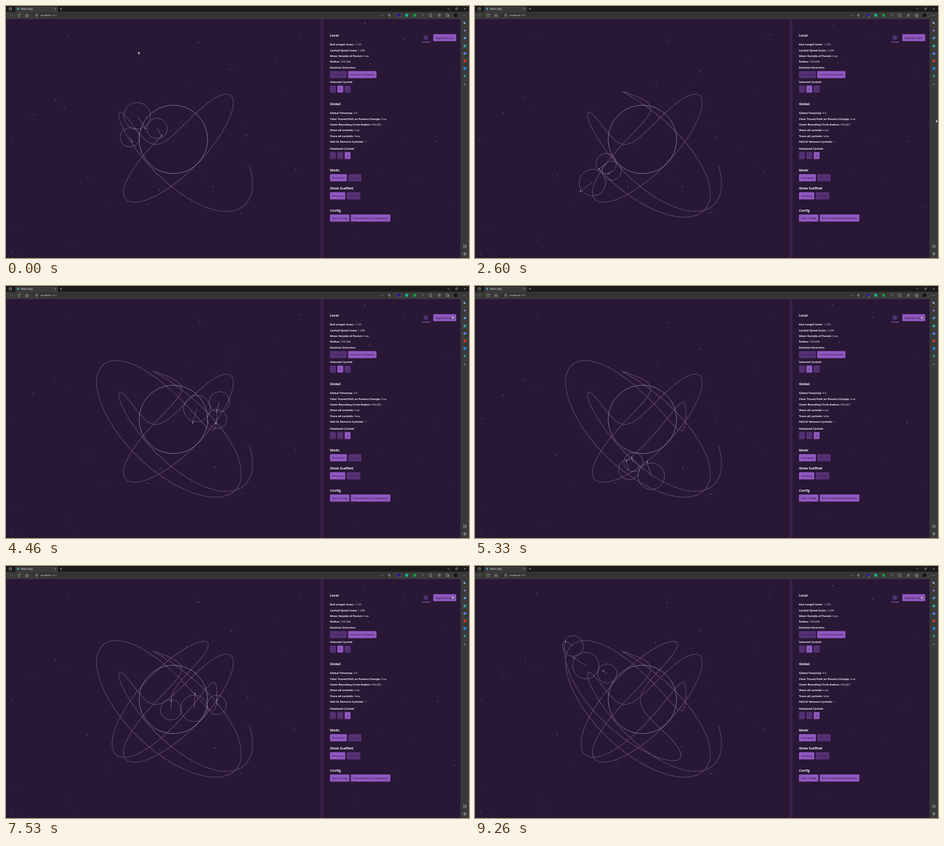
An HTML page for the animation above (9.32 s loop, 1000 by 544 pixels).

```html
<!DOCTYPE html>
<html lang="en">
<head>
<meta charset="utf-8">
<title>Cycloids</title>
<style>
  html, body { margin: 0; width: 100%; height: 100%; overflow: hidden; background: #291736; }
  svg { display: block; width: 100vw; height: 100vh; }
  text { font-family: "Open Sans", "Noto Sans", sans-serif; font-size: 5.9px; fill: #f7f4f9; }
  .head { font-size: 7.3px; font-weight: 700; }
  .label { font-weight: 700; }
  .value { font-weight: 400; }
  .button { font-size: 6px; fill: #2a1738; }
  .icons { fill: none; stroke: #c8c8c8; stroke-width: .7; }
  .off { filter: blur(.6px); }
  .off text { fill: #3c2251; }
</style>
</head>
<body>
<svg viewBox="0 0 1000 544">
  <rect width="1000" height="544" fill="#291736"/>
  <rect x="679.5" y="28" width="6.5" height="516" fill="#382148"/>
  <g id="panel"></g>
  <g id="stars" fill="#a596b3"></g>
  <path id="trace" fill="none" stroke="#614975" stroke-width="1.3" stroke-linejoin="round"/>
  <g id="wheels" fill="none"></g>
  <g id="chrome">
    <rect width="1000" height="13" fill="#1b1b1b"/>
    <path d="M0 12.5H18Q20 12.5 20 10V3Q20 1 22 1H110Q112 1 112 3V10Q112 12.5 114 12.5H1000V544H981.5V27.5H0Z" fill="#3a3a3a"/>
    <rect x="57" y="14.5" width="779" height="11" rx="2" fill="#323232"/>
    <path d="M0 27.4H981.5" stroke="#555" stroke-width=".6"/>
    <circle cx="26" cy="6.2" r="2.3" fill="#4f9db0"/>
    <text x="32.5" y="8.2" style="font-size:5.4px">React App</text>
    <text x="75" y="21.9" style="font-size:5.3px">localhost<tspan fill="#a5a5a5">:3001</tspan></text>
    <text x="811" y="22" style="font-size:5px;fill:#999">A”</text>
    <g class="icons">
      <path d="M7 4H12V9H7ZM7 5H12"/>
      <path d="M104.7 4.8l2.6 2.6m0-2.6l-2.6 2.6M116.2 6h5m-2.5-2.5v5"/>
      <path d="M953.5 6h4m14-1.8h3.5v3.5h-3.5zM989.4 4.3l3.4 3.4m0-3.4l-3.4 3.4"/>
      <path d="M14 20H8.5M11 17.5L8.5 20L11 22.5" stroke="#686868"/>
      <path d="M30.4 18.5A2.8 2.8 0 1 0 30.8 20.6M30.7 16.8V18.8H28.7"/>
      <path d="M42.5 19.4L45.2 17L48 19.4V22.7H46.3V20.6H44.2V22.7H42.5Z"/>
      <circle cx="66.5" cy="19.8" r="2.7"/>
      <path d="M66.5 19.4v2m0-3.3v.6"/>
      <path d="M914.5 18h1.7a1.2 1.2 0 0 1 2.3 0h1v4.6h-5z"/>
      <path d="M950.5 17.2h4.5v4.3h-4.5zM952 22.8h4.5v-4.3"/>
      <path d="M986.3 20h6" stroke-dasharray=".9 1.4" stroke-width="1"/>
      <circle cx="900" cy="20" r="2" stroke="#929292"/>
      <path d="M982.5 160.7h17" stroke="#505050"/>
      <path d="M988.5 169h5m-2.5-2.5v5" stroke="#a8a8a8"/>
      <path d="M988.3 516.5h5.4v4.8h-5.4zm2.2 2.5h3.2"/>
      <circle cx="991" cy="535" r="2.7"/><circle cx="991" cy="535" r="1"/>
    </g>
    <circle cx="848.6" cy="19.8" r="3.4" fill="#35129b"/>
    <text x="849.8" y="23.8" style="font-size:4px">4</text>
    <circle cx="865.5" cy="20" r="3.4" fill="#16b58a"/>
    <rect x="879.5" y="17" width="6" height="6" rx="1" fill="#1a9a45"/>
    <circle cx="971" cy="20" r="4.4" fill="#17171a"/>
  </g>
  <path id="cursor" d="M0 0V6.3L1.5 5L2.4 7.1L3.4 6.7L2.5 4.6H4.4Z" fill="#fff" stroke="#111" stroke-width=".4"/>
</svg>
<script>
const LOOP = 9320, FPS = 15, RAD = Math.PI / 180;
const $ = id => document.getElementById(id);

function set(node, attrs) {
  for (const key in attrs) node.setAttribute(key, attrs[key]);
  return node;
}
function add(parent, tag, attrs, content) {
  const node = set(document.createElementNS("http://www.w3.org/2000/svg", tag), attrs);
  if (content) node.textContent = content;
  return parent.appendChild(node);
}

// Control panel: text and buttons flow from a left edge
const panel = $("panel"), LEFT = 699.7, PITCH = 12.45, PAD = 4.7, GAP = 3.1;

function write(y, content, cls, value) {
  const node = add(panel, "text", { x: LEFT, y: y + 2.1, class: cls }, content);
  if (value) add(node, "tspan", { class: "value" }, "\u00a0" + value);
}

function button(x, y, content, on) {
  const group = add(panel, "g", { class: on ? "" : "off" });
  const box = add(group, "rect", { x, y, height: 15.3, rx: 1.5, fill: on ? "#9058c1" : "#553174" });
  const label = add(group, "text", { x: x + PAD, y: y + 9.8, class: on ? "button" : "" }, content);
  const width = label.getComputedTextLength() + 2 * PAD;
  set(box, { width });
  return x + width + GAP;
}

// A leading "~" marks a dimmed button
function block(y, head, lines, buttons = []) {
  if (head) {
    write(y + .5, head, "head");
    y += lines.length ? 20 : .9;
  }
  lines.forEach((line, i) => {
    const [label, value] = line.split(": ");
    write(y + i * PITCH, label.replace(/:?$/, ":"), "label", value);
  });
  y += Math.max(0, lines.length - 1) * PITCH + 7.7;
  buttons.reduce((x, name) => button(x, y, name.replace("~", ""), name[0] !== "~"), LEFT);
}

block(63, "Local", [
  "Rod Length Scale: 1.133", "Cycloid Speed Scale: 1.298", "Move Outside of Parent: true",
  "Radius: 166.668", "Rotation Direction"
], ["~Clockwise", "Counter Clockwise"]);
block(164, "", ["Selected Cycloid"], ["~0", "1", "~2"]);
block(211, "Global", [
  "Global Timestep: 4.4", "Clear Traced Path on Params Change: true",
  "Outer Bounding Circle Radius: 430.667", "Show all cycloids: true",
  "Trace all cycloids: false", "Add Or Remove Cycloids: \u00a0+\u00a0\u00a0\u00a0-"
]);
block(307.5, "", ["Displayed Cycloid"], ["~0", "~1", "2"]);
block(354.5, "Mode", [], ["Animated", "~Instant"]);
block(393.5, "Show Scaffold", [], ["Showing", "~Hidden"]);
block(441.5, "Config", [], ["Save Config", "Show Saved Configurations"]);
button(922.8, 60.7, "Register/Login", true);
add(panel, "circle", { cx: 907, cy: 68, r: 5.5, fill: "#49316a" });
add(panel, "rect", { x: 897.5, y: 77, width: 18.5, height: 1.5, rx: .7, fill: "#9058c1" });

// Browser icons
const polar = ([x, y], r, deg) => [x + r * Math.cos(deg * RAD), y + r * Math.sin(deg * RAD)];
const format = p => p[0].toFixed(2) + " " + p[1].toFixed(2);

function starPath(center, r) {
  const corners = Array.from({ length: 10 }, (_, i) => format(polar(center, i % 2 ? r * .45 : r, i * 36 - 90)));
  return `M${corners.join("L")}Z`;
}
for (const x of [828, 936]) add($("chrome"), "path", { d: starPath([x, 20], 3), class: "icons" });

const disc = "M-3 0a3 3 0 1 1 6 0a3 3 0 1 1-6 0", square = "M-3-3H3V3H-3Z";
[
  ["#8cbde8", "M.8.8a2 2 0 1 0-.6.6L2.4 3.6 3 3Z"],
  ["#a878dc", "M0-3L1-1 3 0 1 1 0 3-1 1-3 0-1-1Z"],
  ["#5ea4ea", "M-3 .6L.5-2.7H3V-.1L-.5 3.3Z"],
  ["#31a29c", "M-3-1.5H-1V-3H1V-1.5H3V3H-3Z"],
  ["#5a82ea", "M-3 3V0L-1-3 1-1 2-2 3 0V3Z"],
  ["#d13a28", disc],
  ["#2485d2", square],
  ["#2fae8d", "M0-3.5L3.2 1.5H.5V3.5H-.5V1.5H-3.2Z"]
].forEach(([fill, d], i) => add($("chrome"), "path", { d, fill, transform: `translate(991 ${36.5 + i * 16.4})` }));

// Background stars, each wobbling around its home
const hash = n => { const v = Math.sin(n * 127.1 + 3.7) * 43758.5453; return v - Math.floor(v); };
const stars = Array.from({ length: 46 }, (_, i) => ({
  x: 975 * hash(i), y: 32 + 508 * hash(i + 100),
  speed: 2 + 3 * hash(i + 200), phase: 6.3 * hash(i + 300),
  node: add($("stars"), "circle", { r: .5 + .5 * hash(i + 400), opacity: .4 + .4 * hash(i + 400) })
}));

// Chain of wheels; all angles follow one parameter, in degrees
const CENTER = [361.5, 288];
const wheels = [
  { r: 20.6, reach: 94.4, rod: 10.3, angle: a => .698 * a },
  { r: 28.6, reach: 49.2, rod: 32.2, angle: a => 1.298 * a },
  { r: 22, reach: 50.6, rod: 18.8, angle: a => 90 - a }
];
add($("wheels"), "circle", { cx: CENTER[0], cy: CENTER[1], r: 73.8, stroke: "#b9adc2", "stroke-width": .75 });
wheels.forEach(w => {
  const style = { stroke: "#94849f", "stroke-width": .7 };
  w.rim = add($("wheels"), "circle", { ...style, r: w.r });
  w.arm = add($("wheels"), "line", style);
  w.dot = add($("wheels"), "circle", { r: 1, fill: "#fff" });
});

function chain(a) {
  let hub = CENTER;
  return wheels.map(w => {
    hub = polar(hub, w.reach, w.angle(a));
    return { hub, tip: polar(hub, w.rod, a) };
  });
}

const TURN = 2.88, FIRST = 777.5, TRACE_START = 2.9, TRACE_STEP = 2;
const trail = Array.from({ length: 1200 }, (_, i) => format(chain(TRACE_START + i * TRACE_STEP)[2].tip));

// Four ticks per picture, with one tick lost now and then
const angleAt = step => FIRST + TURN * (4 * step - Math.floor((step + 51) / 64));

const ease = (t, from, to) => {
  const k = Math.min(1, Math.max(0, (t - from) / (to - from)));
  return k * k * (3 - 2 * k);
};

function render(ms) {
  const t = Math.floor(ms % LOOP / 10) * 10;
  const step = Math.floor((t + 9.9) * FPS / 1000);
  const time = step / FPS, a = angleAt(step);

  const pose = chain(a);
  wheels.forEach((w, i) => {
    const { hub: [x, y], tip: [tx, ty] } = pose[i];
    set(w.rim, { cx: x, cy: y });
    set(w.arm, { x1: x, y1: y, x2: tx, y2: ty });
    set(w.dot, { cx: tx, cy: ty });
  });
  const done = trail.slice(0, Math.ceil((a - TRACE_START) / TRACE_STEP));
  set($("trace"), { d: "M" + [...done, format(pose[2].tip)].join("L") });

  stars.forEach(({ x, y, speed, phase, node }) => set(node, {
    cx: x + 2 * Math.sin(time * speed + phase),
    cy: y + 3.2 * Math.cos(time * speed * 1.3 + phase * 2)
  }));

  const out = ease(time, 0, 1.03), up = ease(time, 3.2, 4.4);
  set($("cursor"), { transform: `translate(${285.5 + 710 * out - 32 * up} ${98 + 147 * out - 180 * up})` });
}

const begin = performance.now();
function tick() {
  render(performance.now() - begin);
  requestAnimationFrame(tick);
}
tick();
</script>
</body>
</html>
```
